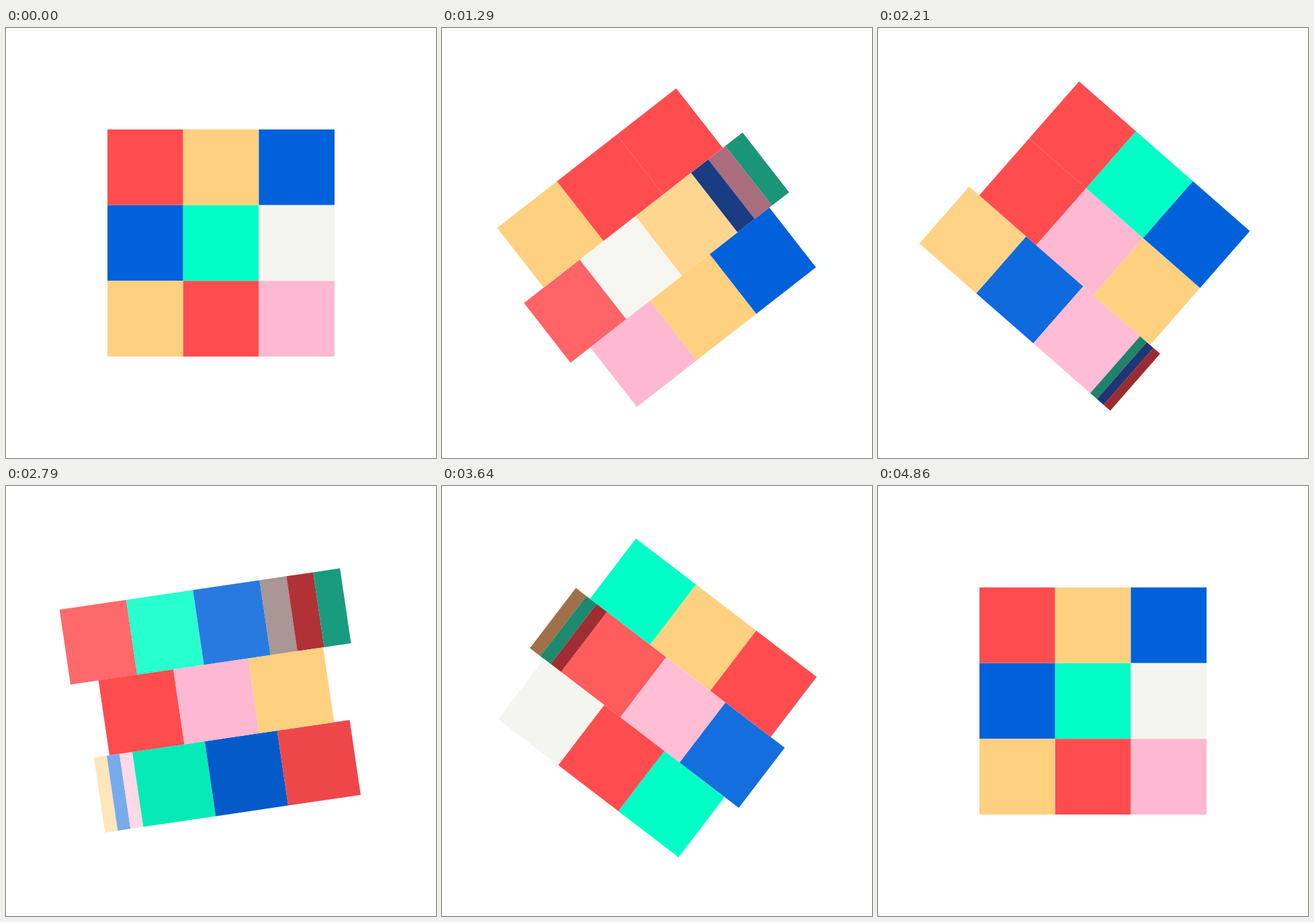
Write an HTML page with a canvas that moves like this. It is 640x640 px and loops after 5070 ms.

```html
<!DOCTYPE html>
<html lang="en">
<head>
<meta charset="utf-8">
<title>Turning cube</title>
<style>
  html, body { margin: 0; height: 100%; overflow: hidden; background: #fff; }
  canvas { display: block; }
</style>
</head>
<body>
<canvas width="640" height="640"></canvas>
<script>
const ctx = document.querySelector('canvas').getContext('2d');
const LOOP = 5070, FPS = 14, LAST = 68;
const SIZE = 338, CELL = SIZE / 3;

const COLORS = {
  R: [255, 77, 79], Y: [255, 208, 127], B: [0, 97, 219],
  G: [0, 255, 198], W: [244, 245, 238], P: [255, 184, 209]
};
const LIGHT = [255, 255, 255], SHADE = [60, 11, 18];

// Whole cube: time, rotation in degrees, centre offset x, y
const POSES = [
  [0, 0, 0, 0], [570, 34, 9.5, 0], [1140, 49.5, 1, 1.5], [1290, 52.1, -.7, 7],
  [1500, 54.5, -1, 11], [1850, 54, -2, 4], [2210, 41.5, -5, -2],
  [2790, -8.7, -7, .5], [3460, -54.3, 0, -3], [3640, -52.7, .5, -4.5],
  [4290, -21.2, -.5, -8], [4570, -9, 0, -2], [4857, 0, 0, 0]
];

// Slice turns; dir 1 moves right or down
const START = 'RYBBGWYRP';
const TURNS = [
  { start: 0, time: 1000, axis: 'row', lane: 1, dir: 1, next: 'RWY' },
  { start: 963, time: 1000, axis: 'col', lane: 1, dir: 1, next: 'GPB' },
  { start: 1991, time: 1064, axis: 'row', lane: 2, dir: -1, next: 'GBR' },
  { start: 2426, time: 1000, axis: 'row', lane: 0, dir: -1, next: 'WRG' },
  { start: 3395, time: 983, axis: 'col', lane: 1, dir: 1, next: 'YGR' },
  { start: 3616, time: 1000, axis: 'col', lane: 2, dir: -1, next: 'BWP' },
  { start: 3844, time: 1007, axis: 'col', lane: 0, dir: -1, next: 'RBY' }
];

const cellIndex = (axis, lane, i) => axis === 'row' ? lane * 3 + i : i * 3 + lane;

function slope(i, k) {
  const a = POSES[Math.max(i - 1, 0)], b = POSES[Math.min(i + 1, POSES.length - 1)];
  return (b[k] - a[k]) / (b[0] - a[0]);
}

// Smooth cubic through the pose list
function poseAt(t) {
  let i = 0;
  while (i < POSES.length - 2 && t > POSES[i + 1][0]) i++;
  const a = POSES[i], b = POSES[i + 1], d = b[0] - a[0];
  const x = Math.min((t - a[0]) / d, 1), y = 1 - x;
  return [1, 2, 3].map(k =>
    a[k] * y * y * (1 + 2 * x) + b[k] * x * x * (3 - 2 * x) +
    d * x * y * (y * slope(i, k) - x * slope(i + 1, k)));
}

function tint(key, overlay, alpha) {
  const mixed = COLORS[key].map((c, i) => Math.round(c + (overlay[i] - c) * alpha));
  return `rgb(${mixed})`;
}

function drawStrip(axis, lane, from, length, keys, overlay, alpha) {
  const across = (lane - 1.5) * CELL, step = length / 3;
  [...keys].forEach((key, i) => {
    const along = from + i * step;
    ctx.fillStyle = tint(key, overlay, alpha);
    if (axis === 'row') ctx.fillRect(along, across, step, CELL);
    else ctx.fillRect(across, along, CELL, step);
  });
}

function drawTurn({ axis, lane, dir, next }, old, u) {
  const total = SIZE * (1 + u * (1 - u) * (1.28 - .23 * u));
  const enter = total * u, leave = total - enter, edge = -total / 2;
  drawStrip(axis, lane, dir > 0 ? edge + enter : edge, leave, old, LIGHT, .55 * u);
  drawStrip(axis, lane, dir > 0 ? edge : edge + leave, enter, next, SHADE, .57 * (1 - u));
}

function draw(t) {
  const [angle, dx, dy] = poseAt(t);
  ctx.setTransform(1, 0, 0, 1, 0, 0);
  ctx.fillStyle = '#fff';
  ctx.fillRect(0, 0, 640, 640);
  ctx.translate(320 + dx, 320 + dy);
  ctx.rotate(angle * Math.PI / 180);

  const grid = [...START];
  for (const turn of TURNS) {
    const x = (t - turn.start) / turn.time;
    if (x <= 0) continue;
    const cells = [0, 1, 2].map(i => cellIndex(turn.axis, turn.lane, i));
    if (x < 1) drawTurn(turn, cells.map(c => grid[c]), (1 - Math.cos(Math.PI * x)) / 2);
    cells.forEach((c, i) => grid[c] = x < 1 ? null : turn.next[i]);
  }
  grid.forEach((key, i) => {
    if (!key) return;
    ctx.fillStyle = tint(key, LIGHT, 0);
    ctx.fillRect((i % 3 - 1.5) * CELL, (Math.floor(i / 3) - 1.5) * CELL, CELL, CELL);
  });
}

function tick() {
  const t = performance.now() % LOOP;
  const step = Math.min(LAST, Math.floor((t + 5) * FPS / 1000));
  draw(step * 1000 / FPS);
  requestAnimationFrame(tick);
}
tick();
</script>
</body>
</html>
```
